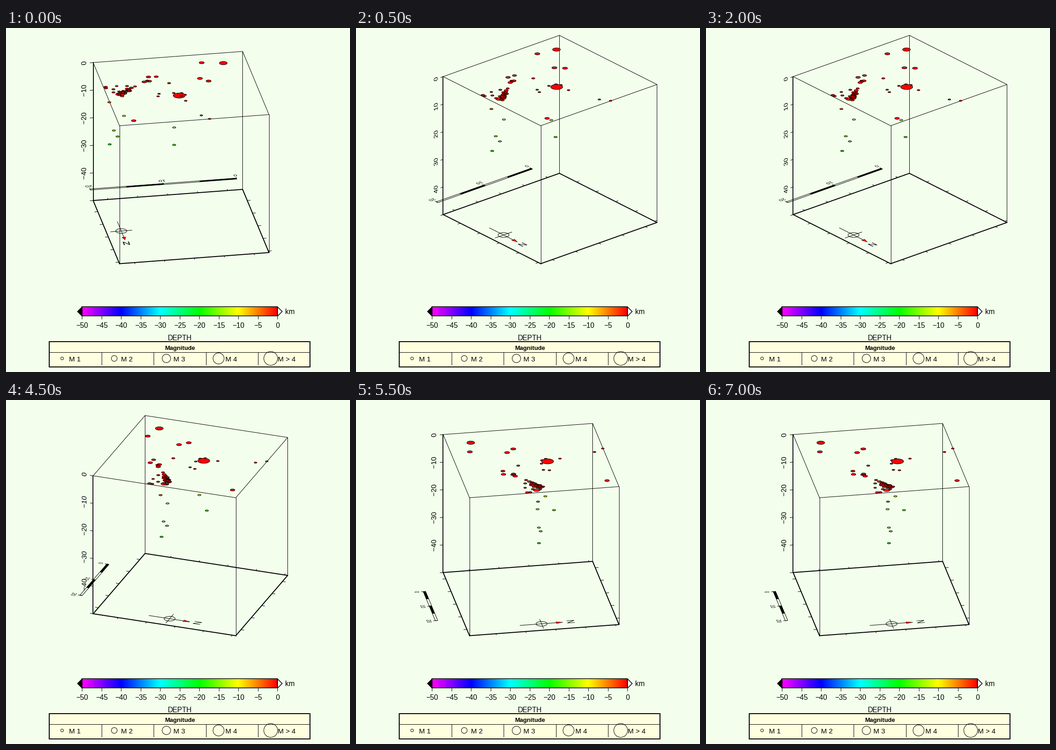
Recreate the animation shown at these times as a matplotlib script. Size 748 px wide and 748 px high, loop 8000 ms.

```python
import colorsys
import math

import numpy as np
import matplotlib.pyplot as plt
from matplotlib.animation import FuncAnimation
from matplotlib.patches import Circle, Ellipse, PathPatch, Polygon, Rectangle
from matplotlib.path import Path
from matplotlib.textpath import TextPath

STAGE = 748
PT = 0.72                       # one pixel in points at 100 dpi
SIDE, FLOOR, KM = 330, 50, 6    # base side in px, depth in km, px per km
TILT = math.sin(math.radians(25))
FONT = "Liberation Sans"
MINUS = "\u2212"

# azimuth and relative length of the scale bar
VIEWS = [(10, 0.98), (40, 0.814), (70, 0.517), (100, 0.46)]

# east, north, width in px
SHALLOW = [
    (.157, .157, 18), (.296, .1265, 12), (.301, .416, 12), (.350, .366, 12),
    (.563, .403, 8), (.629, .289, 10), (.680, .284, 11), (.686, .350, 11),
    (.721, .355, 11), (.704, .350, 9), (.697, .338, 7), (.531, .605, 27),
    (.5596, .559, 7), (.509, .572, 8), (.490, .600, 7), (.517, .613, 8),
    (.503, .693, 7), (.441, .935, 7), (.397, .998, 7), (.657, .555, 7),
    (.670, .593, 7), (.793, .415, 8), (.894, .939, 11), (.985, .389, 9),
    (.9855, .409, 8), (.911, .388, 7), (.844, .400, 8), (.941, .434, 8),
    (.949, .4815, 8), (.8205, .4325, 10), (.914, .508, 8), (.838, .449, 9),
]
# east, north, depth in km
DEEP = [
    (.9735, .463, 3.9), (.8775, .477, 8.9), (.945, .474, 14), (.923, .490, 15.9),
    (.972, .4696, 19), (.561, .585, 11.9), (.571, .641, 16.9),
]


def make_quakes():
    rng = np.random.default_rng(11)
    rows = [(e, n, w, 0) for e, n, w in SHALLOW]
    rows += [(e, n, 8, d) for e, n, d in DEEP]
    rows += [(.909, .465, 15, 1.2), (.890, .477, 9, 1.7)]
    for t in rng.uniform(0, 1, 24):
        e = .838 + .076 * t + rng.normal(0, .009)
        n = .442 + .056 * t + rng.normal(0, .009)
        rows.append((e, n, rng.uniform(7.5, 10.5), rng.uniform(0, 1)))
    return rows


def depth_color(km):
    return colorsys.hsv_to_rgb(km / 60, 1, 1)


fig = plt.figure(figsize=(STAGE / 100, STAGE / 100), dpi=100, facecolor="#f3ffec")
ax = fig.add_axes([0, 0, 1, 1])
ax.axis("off")


class View:
    """The box seen from one azimuth, with all its artists."""

    def __init__(self, azimuth, bar):
        a = math.radians(azimuth)
        self.east = np.array([-math.cos(a), TILT * math.sin(a)])
        self.north = np.array([math.sin(a), TILT * math.cos(a)])
        self.origin = np.zeros(2)
        self.artists = []
        corners = [(0, 0), (1, 0), (1, 1), (0, 1)]
        pts = np.array([self.at(*c) for c in corners])
        self.origin = np.array([189 - pts[:, 0].min(), 212 - pts[:, 1].max()])

        self.draw_box(corners)
        self.draw_base_ticks()
        self.draw_depth_axis(corners, "" if azimuth == 40 else MINUS)
        self.draw_scale(bar)
        self.draw_compass()
        self.draw_quakes()

    def at(self, e, n, km=0):
        flat = self.origin + SIDE * (e * self.east + n * self.north)
        return flat + np.array([0, KM * km])

    def line(self, *pts, lw=1.0):
        x, y = zip(*pts)
        self.artists += ax.plot(x, y, color="black", lw=lw * PT, zorder=2,
                                solid_capstyle="round")

    def patch(self, p):
        p.set_zorder(2)
        self.artists.append(ax.add_patch(p))

    def text(self, pos, s, size, right, up):
        """Text centred on pos and laid in the plane of two screen vectors."""
        path = TextPath((0, 0), s, size=size, prop={"family": FONT})
        v = path.vertices - [path.get_extents().x0, 0]
        v = v - [path.get_extents().width / 2, 0.35 * size]
        v = pos + v[:, :1] * right + v[:, 1:] * up
        self.patch(PathPatch(Path(v, path.codes), fc="black", lw=0))

    def draw_box(self, corners):
        for c, d in zip(corners, corners[1:] + corners[:1]):
            self.line(self.at(*c), self.at(*d))
            self.line(self.at(*c, FLOOR), self.at(*d, FLOOR), lw=2)
            self.line(self.at(*c), self.at(*c, FLOOR))

    def draw_base_ticks(self):
        for k in range(5):
            e, n = .1 + .2 * k, .176 + .2 * k
            for edge, out in ((0, -.021), (1, 1.021)):
                self.line(self.at(e, edge, FLOOR), self.at(e, out, FLOOR))
                self.line(self.at(edge, n, FLOOR), self.at(out, n, FLOOR))

    def draw_depth_axis(self, corners, sign):
        left = min(corners, key=lambda c: self.at(*c)[0])
        wide = max((self.east, self.north), key=lambda v: abs(v[0]))
        out = -wide * np.sign(wide[0])
        top = self.at(*left)
        self.line(top, self.at(*left, FLOOR), lw=1.7)
        for km in range(0, FLOOR + 1, 10):
            p = top + [0, KM * km]
            self.line(p, p + 7 * out)
            if km < FLOOR:
                label = f"{sign}{km}" if km else "0"
                self.text(p + 21 * out, label, 15.5, np.array([0, -1]), out)

    def draw_scale(self, length):
        n, half = -.173, .008
        for k in range(4):
            e0 = .5 + length * (k / 4 - .5)
            e1 = e0 + length / 4
            quad = [self.at(e, m, FLOOR) for e, m in
                    ((e0, n - half), (e1, n - half), (e1, n + half), (e0, n + half))]
            self.patch(Polygon(quad, fc="none" if k % 2 else "black",
                               ec="black", lw=PT))
        for k in range(3):
            e = .5 + length * (k / 2 - .5)
            self.line(self.at(e, n - .02, FLOOR), self.at(e, n + half, FLOOR))
            self.text(self.at(e, n - .05, FLOOR), str(10 * k), 14,
                      self.east, self.north)

    def draw_compass(self):
        e, n = .9, .5
        self.line(self.at(e, n - .145, FLOOR), self.at(e, n + .14, FLOOR))
        self.line(self.at(e - .072, n, FLOOR), self.at(e + .072, n, FLOOR))
        self.patch(Ellipse(self.at(e, n, FLOOR), 24, 24 * TILT, fc="none",
                           ec="black", lw=PT))
        head = [self.at(e + de, n + dn, FLOOR) for de, dn in
                ((-.013, .098), (.013, .098), (0, .14))]
        self.patch(Polygon(head, fc="red", ec="black", lw=.6 * PT))
        self.text(self.at(e, n + .195, FLOOR), "N", 24, self.east, self.north)

    def draw_quakes(self):
        # far ones first
        for e, n, w, km in sorted(QUAKES, key=lambda q: self.at(*q[:2])[1]):
            self.patch(Ellipse(self.at(e, n, km), w - 1, (w - 1) * TILT,
                               fc=depth_color(km), ec="black", lw=PT))

    def show(self, on):
        for a in self.artists:
            a.set_visible(on)


def label(x, y, s, size=15.5, ha="center", weight="normal"):
    ax.text(x, y + 0.35 * size, s, fontsize=size * PT, family=FONT, ha=ha,
            va="baseline", weight=weight, color="black")


def rule(x0, y0, x1, y1, lw=1.0):
    ax.plot([x0, x1], [y0, y1], color="black", lw=lw * PT, solid_capstyle="butt")


def draw_colorbar():
    x0, x1, y0, y1 = 165, 590, 606, 626
    ramp = [[depth_color(km) for km in np.linspace(FLOOR, 0, x1 - x0)]]
    ax.imshow(ramp, extent=(x0, x1, y1, y0), aspect="auto", zorder=0)
    mid = (y0 + y1) / 2
    for x, tip, fill in ((x0, x0 - 10, "black"), (x1, x1 + 10, "white")):
        ax.add_patch(Polygon([(x, y0), (tip, mid), (x, y1)], fc=fill,
                             ec="black", lw=1.5 * PT))
    ax.add_patch(Rectangle((x0, y0), x1 - x0, y1 - y0, fc="none", ec="black",
                           lw=1.5 * PT))
    for k in range(11):
        x = x0 + (x1 - x0) * k / 10
        km = 50 - 5 * k
        rule(x, y1, x, y1 + 7)
        label(x, 646, f"{MINUS}{km}" if km else "0")
    label(607, mid, "km", ha="left")
    label(377.5, 673, "DEPTH")


def draw_legend():
    ax.add_patch(Rectangle((94, 682), 567, 55, fc="#ffffe0", ec="black",
                           lw=2 * PT))
    rule(94, 704.5, 661, 704.5)
    label(377.5, 694.5, "Magnitude", size=13.2, weight="bold")
    names = ["M 1", "M 2", "M 3", "M 4", "M > 4"]
    for k, (name, r) in enumerate(zip(names, (3, 6.3, 9.2, 12, 15))):
        x = 94 + 113.4 * k
        if k:
            rule(x, 705, x, 733)
        ax.add_patch(Circle((x + 27.5, 718), r, fc="none", ec="black", lw=PT))
        label(x + 42.5, 719, name, size=15.3, ha="left")


QUAKES = make_quakes()
draw_colorbar()
draw_legend()
views = [View(*v) for v in VIEWS]
ax.set_xlim(-.5, STAGE - .5)
ax.set_ylim(STAGE - .5, -.5)


def update(i):
    # the first view holds one step, the others five each
    current = (i + 4) // 5
    for k, view in enumerate(views):
        view.show(k == current)
    return []


anim = FuncAnimation(fig, update, frames=16, init_func=lambda: update(0),
                     interval=500, repeat=True, repeat_delay=0, blit=False)
plt.show()
```
